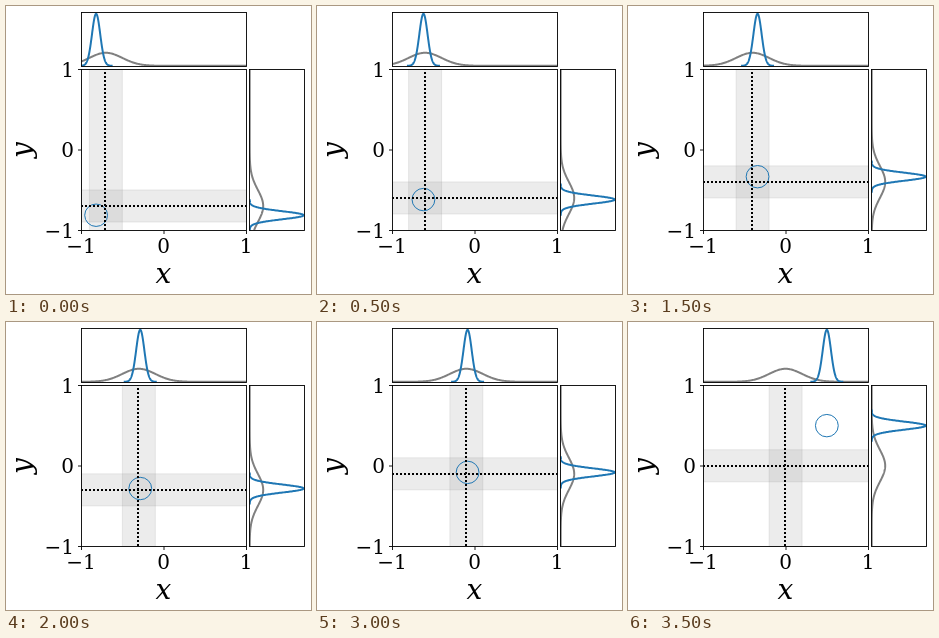
Animation of 305 by 288 pixels, one loop 6000 ms. Source, as an HTML page with a canvas:

```html
<!DOCTYPE html>
<html lang="en">
<head>
<meta charset="utf-8">
<title>Tracking a mean</title>
<style>
  html, body { margin: 0; width: 100%; height: 100%; overflow: hidden; background: #fff; }
  canvas { display: block; }
</style>
</head>
<body>
<canvas id="stage" width="305" height="288"></canvas>
<script>
const ctx = document.getElementById('stage').getContext('2d');
const BLUE = '#1f77b4', GRAY = '#808080', BAND = 'rgba(128,128,128,0.15)';
const FONT = '"DejaVu Serif", "Noto Serif", serif';
const LOOP = 6000, STEP = 500;

const main = [75.5, 63.5, 165, 161];
const top_ = [75.5, 6.5, 165, 54];
const side = [243.5, 63.5, 55, 161];

// Sampled point per step; the mean climbs by 0.1 from -0.7 to 0
const samples = [
  [-0.818, -0.815], [-0.62, -0.62], [-0.48, -0.475], [-0.34, -0.335],
  [-0.283, -0.283], [-0.18, -0.18], [-0.085, -0.082], [0.5, 0.5]
];

const px = x => 157.6 + 82.5 * x;
const py = y => 143.8 - 80.3 * y;

function clipped(box, draw) {
  ctx.save();
  ctx.beginPath();
  ctx.rect(...box);
  ctx.clip();
  draw();
  ctx.restore();
}

function line(points, color, width, dash = []) {
  ctx.beginPath();
  points.forEach(p => ctx.lineTo(...p));
  ctx.strokeStyle = color;
  ctx.lineWidth = width;
  ctx.setLineDash(dash);
  ctx.stroke();
  ctx.setLineDash([]);
}

function bell(mean, sigma, from, to, place, color) {
  const points = [];
  for (let i = 0; i <= 200; i++) {
    const v = from + (to - from) * i / 200;
    points.push(place(v, 0.05 / sigma * Math.exp(-(((v - mean) / sigma) ** 2) / 2)));
  }
  line(points, color, 2);
}

function bells(mean, center, place) {
  bell(mean, 0.2, -1, 1, place, GRAY);
  bell(center, 0.05, center - 0.2, center + 0.2, place, BLUE);
}

function band(x, y, w, h) {
  ctx.fillStyle = ctx.strokeStyle = BAND;
  ctx.lineWidth = 1;
  ctx.fillRect(x, y, w, h);
  ctx.strokeRect(x, y, w, h);
}

function text(str, x, y, align, font = '20px ') {
  ctx.font = font + FONT;
  ctx.textAlign = align;
  ctx.fillText(str, x, y);
}

function axes() {
  ctx.strokeStyle = ctx.fillStyle = '#000';
  ctx.lineWidth = 0.9;
  [main, top_, side].forEach(box => ctx.strokeRect(...box));
  [-1, 0, 1].forEach((v, i) => {
    const label = ['−1', '0', '1'][i];
    const x = 75.5 + 82.5 * (v + 1), y = 144 - 80.5 * v;
    line([[x, 224.5], [x, 228]], '#000', 0.9);
    line([[72, y], [75.5, y]], '#000', 0.9);
    text(label, x - 0.5, 247, 'center');
    text(label, 68, y + 7.4, 'right');
  });
  text('x', 157.5, 276.5, 'center', 'italic 28px ');
  ctx.save();
  ctx.translate(24.5, 144);
  ctx.rotate(-Math.PI / 2);
  text('y', 0, 0, 'center', 'italic 28px ');
  ctx.restore();
}

function draw(time) {
  const step = Math.min(7, Math.floor(time % LOOP / STEP));
  const mean = (step - 7) / 10;
  const [sx, sy] = samples[step];

  ctx.fillStyle = '#fff';
  ctx.fillRect(0, 0, 305, 288);

  clipped(main, () => {
    band(px(mean - 0.2), 60, 33, 170);
    band(70, py(mean + 0.2), 180, 32.1);
    ctx.beginPath();
    ctx.ellipse(px(sx), py(sy), 11.4, 11.2, 0, 0, 2 * Math.PI);
    ctx.strokeStyle = BLUE;
    ctx.lineWidth = 1;
    ctx.stroke();
    const mx = Math.round(px(mean) - 0.5), my = Math.round(py(mean));
    line([[mx, 224], [mx, 63]], '#000', 2, [2, 2]);
    line([[75, my], [241, my]], '#000', 2, [2, 2]);
  });
  clipped(top_, () => bells(mean, sx, (v, h) => [px(v), 59.8 - 52 * h]));
  clipped(side, () => bells(mean, sy, (v, h) => [243.7 + 54 * h, py(v)]));
  axes();
}

function frame() {
  draw(performance.now());
  requestAnimationFrame(frame);
}
frame();
</script>
</body>
</html>
```
